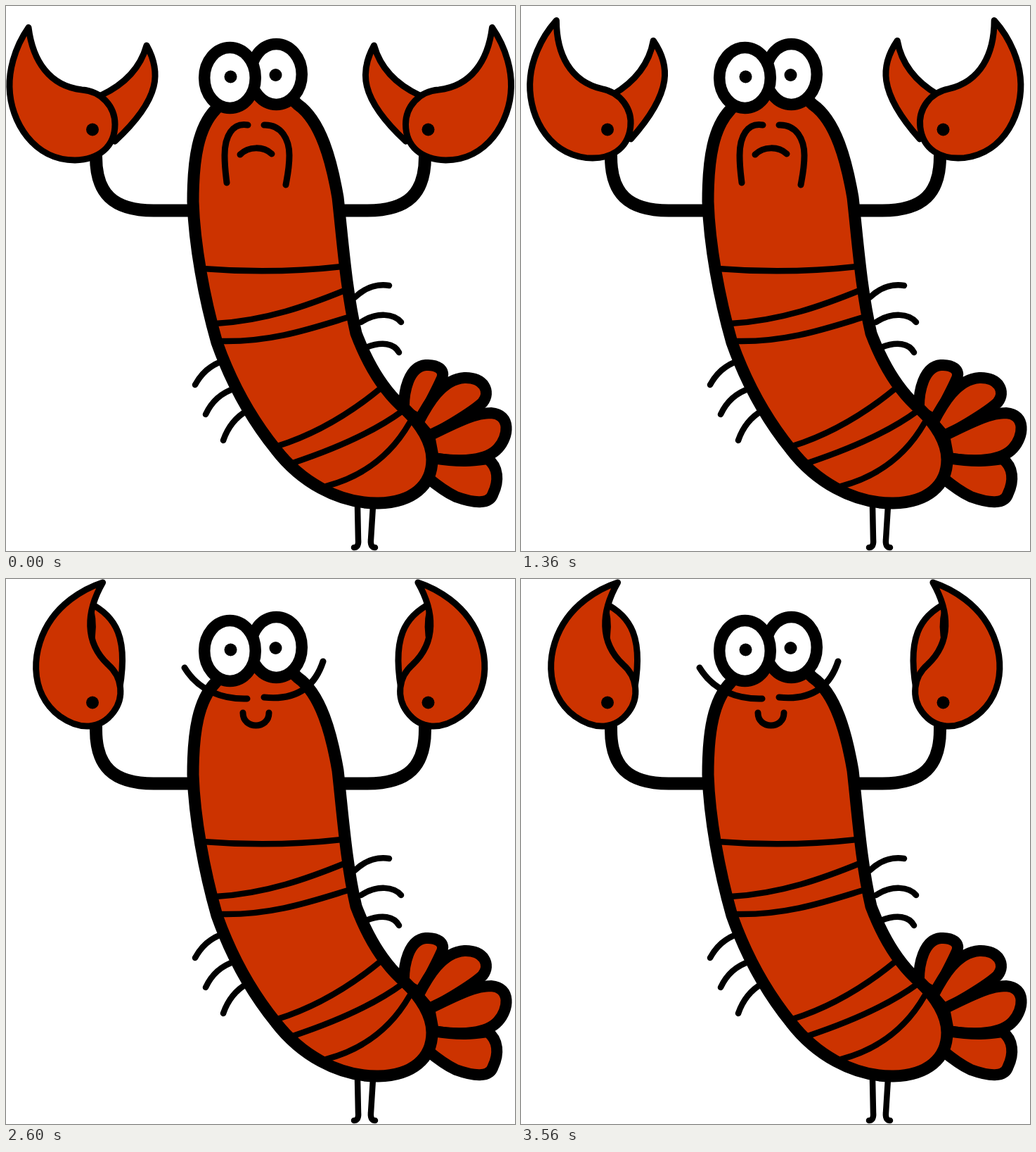
Animation of 724 by 774 pixels, one loop 3600 ms. Source, as an HTML page:

```html
<!DOCTYPE html>
<html lang="en">
<head>
<meta charset="utf-8">
<title>Dancing lobster</title>
<style>
  html, body { margin: 0; width: 100%; height: 100%; overflow: hidden; background: #fff; }
  svg { display: block; }
  .shape { fill: #c30; stroke: #000; stroke-linejoin: round; stroke-linecap: round; }
  .line { fill: none; stroke: #000; stroke-width: 8.5; stroke-linecap: round; }
</style>
</head>
<body>
<svg width="724" height="774" viewBox="0 0 724 774">
  <defs>
    <path id="arm" d="M128 200V214C128 266 152 290.5 210 290.5H268" fill="none" stroke="#000" stroke-width="18"/>
  </defs>

  <use href="#arm"/>
  <use href="#arm" transform="matrix(-1 0 0 1 724 0)"/>

  <g class="line">
    <path d="M269 538Q282 514 306 505M284 580Q297 552 326 543M309 617Q319 588 344 574"/>
    <path d="M496 414Q518 393 545 397M505 449C528 434 552 437 562 449M512 485C535 476 552 479 559 492"/>
    <path d="M500 710L501 758Q502 769 495 769M522 710L519 758Q518 769 525 769"/>
  </g>

  <g class="shape" stroke-width="16">
    <path d="M566 575C565 547 573 512 597 510C612 509 627 516 619 531C613 545 602 565 590 588Z"/>
    <path d="M586 592C600 565 620 530 652 528C680 527 690 548 678 563C660 580 625 598 603 612Z"/>
    <path d="M602 610C640 592 665 578 690 578C719 580 715 612 700 628C685 645 650 649 608 642Z"/>
    <path d="M608 642C650 649 670 645 685 643C701 655 701 675 693 692C688 709 665 706 640 697C625 690 612 680 600 670Z"/>
    <path stroke-width="17" d="M298 147C274 172 266 215 266 278C268 340 282 415 300 478C322 540 350 588 384 630C418 674 472 707 530 706
      C578 705 606 681 606 644C606 620 590 594 568 573C535 545 512 502 498 465C484 405 479 335 472 272C463 220 448 163 415 140
      C390 113 330 113 298 147Z"/>
  </g>

  <path class="line" d="M280 373Q380 381 478 370M298 451C370 447 430 425 484 403M304 476C380 478 440 456 490 441
    M386 625C450 605 500 570 534 542M408 649C480 625 530 600 564 575M455 682C520 665 555 625 574 592"/>

  <path class="line" id="face" style="stroke-width: 9"/>

  <g id="open" class="shape" stroke-width="16.500">
    <ellipse cx="384.500" cy="97" rx="36.300" ry="43" fill="#fff"/>
    <circle cx="383.500" cy="98" r="9" fill="#000" stroke="none"/>
    <ellipse cx="318.500" cy="102" rx="36.300" ry="43" fill="#fff"/>
    <circle cx="319.500" cy="100.500" r="9" fill="#000" stroke="none"/>
  </g>
  <g id="shut" class="shape" stroke-width="17">
    <ellipse cx="386" cy="107.500" rx="49.500" ry="33"/>
    <path d="M345 110H432" stroke-width="8"/>
    <ellipse cx="316" cy="112" rx="49.500" ry="33"/>
    <path d="M270 114H362" stroke-width="8"/>
  </g>

  <g id="claw" class="shape" stroke-width="9">
    <path id="small" d="M200 56C220 92 222 130 155 192L110 160L135 127C165 113 190 92 200 56Z"/>
    <path id="big" d="M32 30.500C10 62 4.500 95 5 115C6 165 40 219 98 219C132 218 155 200 155 168C155 143 136 121 108 119C62 114 38 78 32 30.500Z"/>
    <circle cx="123" cy="175.500" r="9" fill="#000" stroke="none"/>
  </g>
  <use href="#claw" transform="matrix(-1 0 0 1 723.500 0)"/>
</svg>

<script>
const LOOP = 3600, SQUINT = 2240, FAST = 2320;
const $ = id => document.getElementById(id);

// Turn in degrees of the big and the small pincer, from open to closed
const poses = [[0, 0], [7, -5.5], [20, -19], [37, -35]];
const slowCycle = [0, 1, 2, 3, 3, 1];
const fastCycle = [0, 1, 2, 3];

const frown = 'M333 211C345 199 366 199 378 210';
const faces = {
  sad: 'M344 169C322 165 311 185 311 212C311 230 313 242 314 251' +
       'M367 169C392 168 403 190 403 212C403 230 400 243 398 254' + frown,
  tense: 'M344 169C318 178 309 195 309 212C309 230 315 243 320 251' +
         'M367 169C393 177 403 195 403 215C403 232 399 245 394 255' + frown,
  happy: 'M343 170C310 171 275 160 254 126' +
         'M367 168C405 172 437 160 451 117' +
         'M337 190C337 214 374 214 374 190'
};

function poseAt(t) {
  if (t < FAST) return poses[slowCycle[Math.floor(t / 80) % 6]];
  return poses[fastCycle[Math.floor((t - FAST) / 40) % 4]];
}

function draw(t) {
  const [big, small] = poseAt(t);
  const mood = t < SQUINT ? 'sad' : t < FAST ? 'tense' : 'happy';
  $('big').setAttribute('transform', `rotate(${big} 123 175.5)`);
  $('small').setAttribute('transform', `rotate(${small} 123 175.5)`);
  $('face').setAttribute('d', faces[mood]);
  $('open').setAttribute('display', mood === 'tense' ? 'none' : 'inline');
  $('shut').setAttribute('display', mood === 'tense' ? 'inline' : 'none');
}

const start = performance.now();
function tick() {
  draw((performance.now() - start) % LOOP);
  requestAnimationFrame(tick);
}
tick();
</script>
</body>
</html>
```
